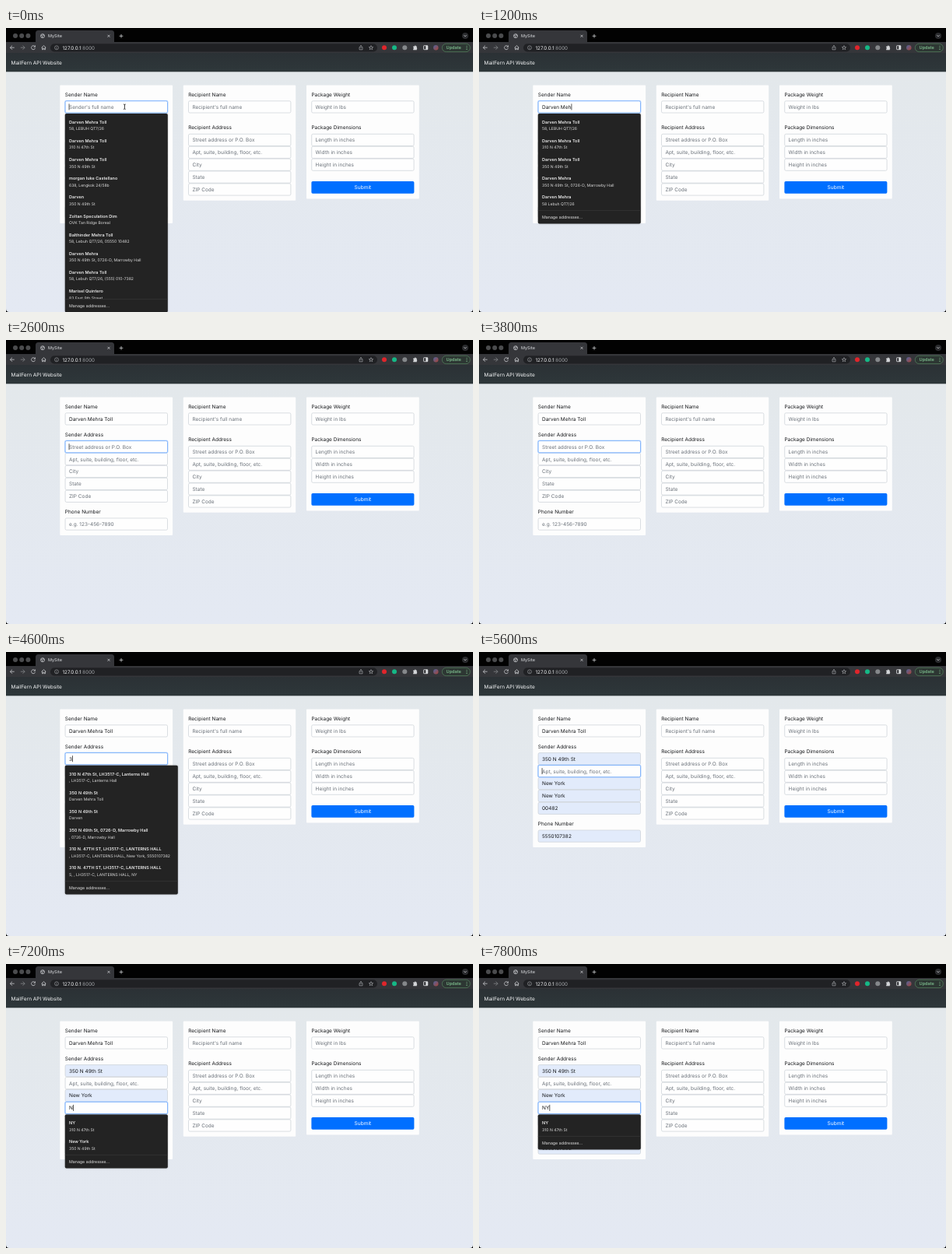
Recreate the animation shown at these times as an HTML page with a canvas. Size 600 by 365 pixels, loop 8000 ms.

```html
<!DOCTYPE html>
<html lang="en">
<head>
<meta charset="utf-8">
<title>MySite</title>
<style>
  html, body { margin: 0; width: 100%; height: 100%; overflow: hidden; background: #000; }
  canvas { display: block; width: 600px; height: 365px; }
</style>
</head>
<body>
<canvas id="stage"></canvas>
<script>
const W = 600, H = 365, LOOP = 8000;
const canvas = document.getElementById('stage');
const ctx = canvas.getContext('2d');
const dpr = window.devicePixelRatio || 1;
canvas.width = W * dpr;
canvas.height = H * dpr;
ctx.textRendering = 'geometricPrecision';

const FONT = 'Inter, "Liberation Sans", sans-serif';
const INK = '#16181b', HINT = '#6a7179';
const FULL = 'Darven Mehra Toll', HOME = '350 N 49th St';

const FIELDS = [
  ['name', 101.4, "Sender's full name"],
  ['street', 137.2, 'Street address or P.O. Box'],
  ['apt', 153.1, 'Apt, suite, building, floor, etc.'],
  ['city', 169, 'City'],
  ['state', 184.9, 'State'],
  ['zip', 200.8, 'ZIP Code'],
  ['phone', 236.6, 'e.g. 123-456-7890']
];

const people = [
  [FULL, '58, LEBUH QT7/26'],
  [FULL, '310 N 47th St'],
  [FULL, HOME]
];
const hall = ['Darven Mehra', HOME + ', 0726-D, Marrowby Hall'];
const LISTS = {
  all: [
    ...people,
    ['morgan luke Castellano', '638, Lengkok 24/58b'],
    ['Darven', HOME],
    ['Zoltan Speculation Dim', 'OVK Tan Ridge Boreal'],
    ['Balthinder Mehra Toll', '58, Lebuh QT7/26, 05550 10482'],
    hall,
    [FULL, '58, Lebuh QT7/26, (555) 010-7382'],
    ['Marisel Quintero', '83 East 9th Street']
  ],
  first: [...people, ['Darven', HOME], hall, ['Darven Mehra', '58 Lebuh QT7/26']],
  middle: [...people, hall, ['Darven Mehra', '58 Lebuh QT7/26']],
  last: people,
  street: [
    ['310 N 47th St, LH3517-C, Lanterns Hall', ', LH3517-C, Lanterns Hall'],
    [HOME, FULL],
    [HOME, 'Darven'],
    [HOME + ', 0726-D, Marrowby Hall', ', 0726-D, Marrowby Hall'],
    ['310 N. 47TH ST, LH3517-C, LANTERNS HALL', ', LH3517-C, LANTERNS HALL, New York, 5550107382'],
    ['310 N. 47TH ST, LH3517-C, LANTERNS HALL', 'S, , LH3517-C, LANTERNS HALL, NY']
  ],
  states: [
    ['New York', HOME], ['NY', '310 N 47th St'], ['New York', HOME + ', 0726-D'],
    ['New York', '310 N 47th St'], ['New York', HOME], ['NY', HOME]
  ],
  n: [['NY', '310 N 47th St'], ['New York', HOME]],
  ny: [['NY', '310 N 47th St']]
};

// Each step changes part of the form state.
const STEPS = [
  [0, { focus: 'name', caret: true, list: 'all', mouse: true, auto: [] }],
  [200, { name: 'D', list: 'first', mouse: false }],
  [400, { name: 'Da' }],
  [600, { name: 'Darv' }],
  [800, { name: 'Darven' }],
  [1000, { name: 'Darven M', list: 'middle' }],
  [1200, { name: 'Darven Meh' }],
  [1400, { name: 'Darven Mehr' }],
  [1800, { caret: false }],
  [2000, { name: 'Darven Mehra', caret: true }],
  [2200, { name: 'Darven Mehra T', list: 'last' }],
  [2400, { name: FULL, list: '' }],
  [2600, { focus: 'street' }],
  [3000, { caret: false }],
  [3400, { caret: true }],
  [3800, { caret: false }],
  [4200, { street: '3', list: 'street', caret: true }],
  [5000, { pick: 1 }],
  [5200, {
    list: '', pick: -1, street: HOME, city: 'New York', state: 'New York', zip: '00482',
    phone: '5550107382', auto: ['street', 'city', 'state', 'zip', 'phone']
  }],
  [5600, { focus: 'apt' }],
  [6200, { caret: false }],
  [6400, { focus: 'city', caret: true }],
  [6600, { focus: 'state' }],
  [6800, { state: '', list: 'states', auto: ['street', 'city', 'zip', 'phone'] }],
  [7200, { state: 'N', list: 'n' }],
  [7400, { state: 'NY', list: 'ny' }]
];

function stateAt(t) {
  const s = {};
  for (const [at, change] of STEPS) if (at <= t) Object.assign(s, change);
  return s;
}

// Text is laid out large and scaled down to keep fractional advances.
function text(str, x, mid, size, color, weight = 400, align = 'left') {
  ctx.save();
  ctx.translate(x, mid + size * 0.364);
  ctx.scale(0.1, 0.1);
  ctx.font = `${weight} ${size * 10}px ${FONT}`;
  ctx.textAlign = align;
  ctx.fillStyle = color;
  ctx.fillText(str, 0, 0);
  const width = ctx.measureText(str).width / 10;
  ctx.restore();
  return width;
}

function rect(x, y, w, h, color) {
  ctx.fillStyle = color;
  ctx.fillRect(x, y, w, h);
}

function box(x, y, w, h, r, fill, stroke, line = 0.6) {
  ctx.beginPath();
  ctx.roundRect(x, y, w, h, r);
  if (fill) { ctx.fillStyle = fill; ctx.fill(); }
  if (stroke) { ctx.strokeStyle = stroke; ctx.lineWidth = line; ctx.stroke(); }
}

function dot(x, y, r, color) {
  ctx.beginPath();
  ctx.arc(x, y, r, 0, Math.PI * 2);
  ctx.fillStyle = color;
  ctx.fill();
}

function icon(path, x, y, color = '#c8cacd', line = 0.8) {
  ctx.save();
  ctx.translate(x, y);
  ctx.strokeStyle = color;
  ctx.lineWidth = line;
  ctx.stroke(new Path2D(path));
  ctx.restore();
}

function drawBrowser() {
  rect(0, 0, W, 19, '#020202');
  for (const x of [12, 20.2, 28.4]) dot(x, 10, 3, '#4b4c4e');
  box(38, 3, 101, 20, 3.5, '#35363a');
  rect(0, 18, W, 14, '#35363a');
  icon('M-2.5 0A2.5 2.5 0 1 1 2.5 0A2.5 2.5 0 1 1-2.5 0M-2-1L0 0L-.5 2M.3-2.3L1-.8L2.3-.3', 47, 10.2);
  text('MySite', 54, 10.2, 5.5, '#dfe1e4');
  icon('M-1.5-1.5L1.5 1.5M1.5-1.5L-1.5 1.5', 132, 10.3);
  icon('M-2.4 0H2.4M0-2.4V2.4', 148, 10.3, '#d0d2d5');
  dot(590, 10, 4, '#2b2c2f');
  icon('M-1.6-.8L0 .9L1.6-.8', 590, 10);

  icon('M2.7 0H-2.6M0-2.6L-2.6 0L0 2.6', 8, 25.2);
  icon('M-2.7 0H2.6M0-2.6L2.6 0L0 2.6', 21.5, 25.2, '#85878a');
  icon('M2-1.6A2.5 2.5 0 1 0 2.5 .6M2.5-2.8V-.9H.6', 35, 25.2);
  icon('M-2.8 0L0-2.6L2.8 0M-2-.5V2.5H-.6V.8H.6V2.5H2V-.5', 48.5, 25.2);
  box(57, 20.3, 420, 10.2, 5.1, '#202124');
  icon('M-2.5 0A2.5 2.5 0 1 1 2.5 0A2.5 2.5 0 1 1-2.5 0M0-.4V1.5M0-1.5V-1', 65, 25.3, '#a6a9ad', 0.6);
  const host = text('127.0.0.1', 72.5, 25.4, 6.3, '#eceef0');
  text(':8000', 72.5 + host, 25.4, 6.3, '#9a9da1');
  icon('M-1-.7H-2V2.6H2V-.7H1M0 1V-2.8M-1.3-1.6L0-2.8L1.3-1.6', 456, 25.2, '#b4b6ba', 0.6);
  icon('M0-2.7L.8-.8L2.7-.7L1.2 .5L1.7 2.4L0 1.3L-1.7 2.4L-1.2 .5L-2.7-.7L-.8-.8Z', 469, 25.3, '#b4b6ba', 0.6);

  dot(486, 25.2, 3, '#e0252b');
  dot(499, 25.2, 3, '#15b886');
  dot(512.3, 25.2, 3, '#85888b');
  ctx.save();
  ctx.translate(525.8, 25.4);
  ctx.fillStyle = '#d3d5d8';
  ctx.fill(new Path2D('M-2.6-1.9H-1A1 1 0 0 1 1-1.9H2V0A1 1 0 0 1 2 1.6V2.8H-2.6V1.4A1 1 0 0 0-2.6-.5Z'));
  ctx.restore();
  box(536.6, 22.7, 5.2, 5, 0.5, null, '#e2e4e6', 0.8);
  rect(539.4, 22.7, 2.4, 5, '#e2e4e6');
  const face = ctx.createLinearGradient(549, 22, 555, 28);
  face.addColorStop(0, '#4b64a0');
  face.addColorStop(1, '#a5473f');
  dot(552.3, 25.2, 3.2, face);
  box(560.3, 20.2, 36, 10.4, 5.2, '#2d3733', '#55865f', 0.7);
  text('Update', 565.5, 25.4, 5.6, '#84c996', 500);
  for (const y of [23.2, 25.3, 27.4]) dot(592, y, 0.55, '#84c996');

  const bar = ctx.createLinearGradient(0, 32, 0, 56);
  bar.addColorStop(0, '#2b3135');
  bar.addColorStop(1, '#2e373a');
  rect(0, 32, W, 24.3, bar);
  text('MailFern API Website', 6.6, 44.6, 6.5, '#f8f9fa');
}

function label(str, x, mid) {
  text(str, x, mid, 6.5, INK);
}

function field(x, mid, hint, value, opt = {}) {
  const y = mid - 7.9;
  if (opt.focus) box(x - 0.7, y - 0.7, 133.4, 17.2, 2.4, '#c2dbfe');
  box(x + 0.3, y + 0.3, 131.4, 15.2, 1.7, opt.auto ? '#e2ebfb' : '#fefefe',
    opt.focus ? '#78aefb' : '#cbd0d6', opt.focus ? 0.9 : 0.7);
  const width = text(value || hint, x + 5.2, mid + 0.1, 6.5, value ? INK : HINT);
  if (opt.caret) rect(x + 5.2 + (value ? width + 0.2 : -0.3), mid - 4, 0.7, 8, '#111');
}

function drawPage(s) {
  const back = ctx.createLinearGradient(0, 56, 0, H);
  back.addColorStop(0, '#e3e8eb');
  back.addColorStop(1, '#e4e9f3');
  rect(0, 56, W, H - 56, back);

  box(69.3, 73.6, 144.8, 177.4, 1, '#fdfdfd');
  box(227.8, 73.6, 144.4, 148.2, 1, '#fdfdfd');
  box(386, 73.6, 144.8, 145.8, 1, '#fdfdfd');

  label('Sender Name', 75.8, 85.4);
  label('Sender Address', 75.8, 121.2);
  label('Phone Number', 75.8, 220.4);
  const ordered = [...FIELDS].sort((a, b) => (a[0] === s.focus) - (b[0] === s.focus));
  for (const [key, mid, hint] of ordered) {
    const focus = key === s.focus;
    field(75.8, mid, hint, s[key], { focus, caret: focus && s.caret, auto: s.auto.includes(key) });
  }

  label('Recipient Name', 234.2, 85.4);
  label('Recipient Address', 234.2, 127.9);
  field(234.2, 101.4, "Recipient's full name");
  FIELDS.slice(1, 6).forEach(([, mid, hint]) => field(234.2, mid + 6.7, hint));

  label('Package Weight', 392.4, 85.4);
  label('Package Dimensions', 392.4, 127.9);
  field(392.4, 101.4, 'Weight in lbs');
  ['Length', 'Width', 'Height'].forEach((side, i) => field(392.4, 143.9 + i * 15.9, side + ' in inches'));
  box(392.4, 197, 132, 15.8, 1.7, '#006fff');
  text('Submit', 458.4, 204.9, 6.6, '#fff', 400, 'center');
}

function drawList(s) {
  if (!s.list) return;
  const rows = LISTS[s.list];
  const top = FIELDS.find(f => f[0] === s.focus)[1] + 8.5;
  const bottom = Math.min(top + 20.9 + rows.length * 24.15, 365.3);
  const width = s.list === 'street' ? 145 : 132;
  const line = bottom - 17.2;
  ctx.save();
  ctx.shadowColor = 'rgba(0,0,0,.3)';
  ctx.shadowBlur = 2 * dpr;
  box(75.8, top, width, bottom - top, 1.8, '#232323');
  ctx.restore();

  ctx.save();
  ctx.beginPath();
  ctx.rect(75.8, top, width, line - top);
  ctx.clip();
  rows.forEach(([title, sub], i) => {
    const y = top + 10.9 + i * 24.15;
    if (i === s.pick) rect(75.8, y - 8, width, 24.15, '#3b3b3c');
    text(title, 81, y, 5.5, '#eaeaea', 600);
    text(sub, 81, y + 8.6, 5.1, '#dedede');
  });
  ctx.restore();
  rect(75.8, line, width, 0.6, '#3a3a3a');
  text('Manage addresses...', 81, bottom - 8.4, 5.3, '#e4e4e4');
}

function drawMouse() {
  const beam = 'M-1.3-3.2Q0-3.2 0-2.3Q0-3.2 1.3-3.2M0-2.3V2.3M-1.3 3.2Q0 3.2 0 2.3Q0 3.2 1.3 3.2';
  icon(beam, 152.4, 101.2, '#fff', 1.8);
  icon(beam, 152.4, 101.2, '#222', 0.9);
}

function draw(t) {
  const s = stateAt(t);
  ctx.setTransform(dpr, 0, 0, dpr, 0, 0);
  rect(0, 0, W, H, '#000');
  ctx.save();
  ctx.beginPath();
  ctx.roundRect(0, 0, W, H, 4);
  ctx.clip();
  drawPage(s);
  drawBrowser();
  drawList(s);
  if (s.mouse) drawMouse();
  ctx.restore();
}

const start = performance.now();
function tick() {
  draw((performance.now() - start) % LOOP);
  requestAnimationFrame(tick);
}
tick();
</script>
</body>
</html>
```
